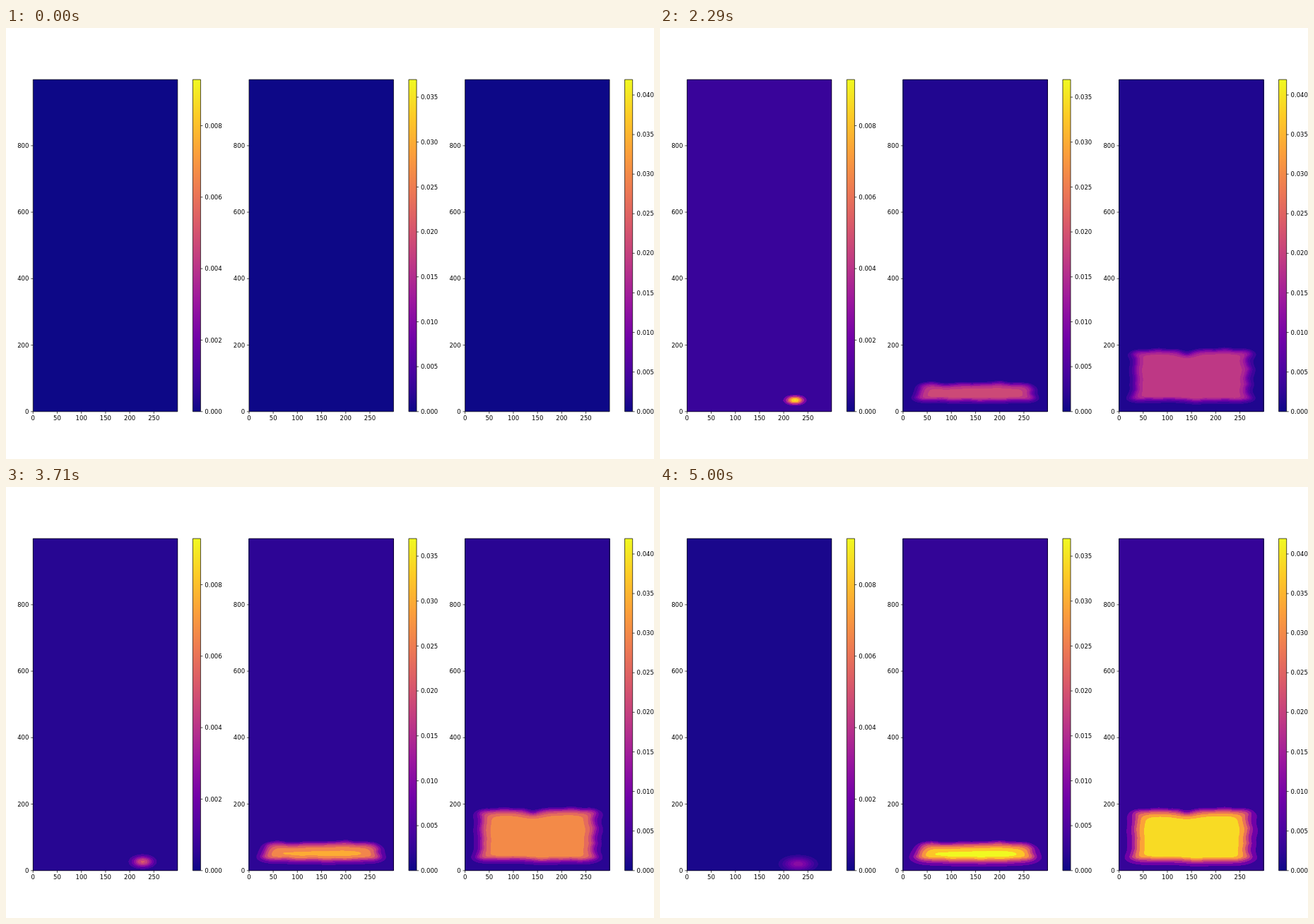
Animation, 917 px wide and 611 px high, one loop 5.08 s. Source, as an HTML page with a canvas:

```html
<!DOCTYPE html>
<html lang="en">
<head>
<meta charset="utf-8">
<title>Density fields</title>
<style>
  html, body { margin: 0; width: 100%; height: 100%; overflow: hidden; background: #fff; }
  canvas, svg { position: absolute; left: 0; top: 0; display: block; }
  text { font: 8.5px "DejaVu Sans", sans-serif; fill: #000; }
</style>
</head>
<body>
<canvas id="fields" width="917" height="611"></canvas>
<svg id="axes" width="917" height="611" viewBox="0 0 917 611"></svg>
<script>
const LOOP = 5080, LAST = 50;
const LEFT = 38.3, PITCH = 305.65, BOTTOM = 543.8, PLOT_W = 204.5, PLOT_H = 470.7;
const SX = PLOT_W / 299, SY = PLOT_H / 999;
const CELL = 2, W = 150, H = 112;

const panels = [
  { vmax: 0.00929, tick: 0.002 },
  { vmax: 0.03696, tick: 0.005 },
  { vmax: 0.04195, tick: 0.005 }
];

// Colour map
const stops = [
  [0, 13, 8, 135], [0.0555, 46, 5, 149], [0.1111, 70, 3, 159], [0.2222, 114, 1, 168],
  [0.3333, 156, 23, 158], [0.4444, 189, 55, 134], [0.5556, 216, 87, 107],
  [0.6667, 237, 121, 83], [0.7778, 251, 159, 58], [0.8889, 253, 202, 38], [1, 240, 249, 33]
];

function track(points, t, col = 1) {
  if (t <= points[0][0]) return points[0][col];
  for (let i = 1; i < points.length; i++) {
    const a = points[i - 1], b = points[i];
    if (t <= b[0]) return a[col] + (b[col] - a[col]) * (t - a[0]) / (b[0] - a[0]);
  }
  return points[points.length - 1][col];
}
const plasma = v => [1, 2, 3].map(c => Math.round(track(stops, v, c)));
const css = c => `rgb(${c.join(",")})`;

// Smooth curve through evenly spaced values
function curve(values, start, gap) {
  return x => {
    const p = Math.min(Math.max((x - start) / gap, 0), values.length - 1.001);
    const i = Math.floor(p), f = (1 - Math.cos(Math.PI * (p - i))) / 2;
    return values[i] + (values[i + 1] - values[i]) * f;
  };
}
const clamp01 = v => Math.min(1, Math.max(0, v));

function grid(fn) {
  const g = new Float32Array(W * H);
  for (let j = 0; j < H; j++)
    for (let i = 0; i < W; i++) g[j * W + i] = fn(i * CELL, j * CELL);
  return g;
}

function region(top, bottom, left, right) {
  const T = curve(top, 20, 20), B = curve(bottom, 20, 20);
  const L = curve(left, 25, 15), R = curve(right, 25, 15);
  const soft = d => clamp01(d / 6 + 0.5);
  return grid((x, y) => {
    const ripple = 1.2 * Math.sin(x * 0.47) + 0.8 * Math.sin(y * 0.4);
    return soft(T(x) + ripple - y) * soft(y - B(x) - ripple) *
           soft(x - L(y) - ripple) * soft(R(y) + ripple - x);
  });
}

function blur(u, n, sn, m, sm, a, times) {
  while (times--)
    for (let r = 0; r < m; r++) {
      let prev = u[r * sm];
      for (let c = 0; c < n; c++) {
        const i = r * sm + c * sn, cur = u[i];
        const next = c < n - 1 ? u[i + sn] : cur;
        u[i] = cur + a * (prev + next - 2 * cur);
        prev = cur;
      }
    }
}

function sink(u, part) {
  for (let i = 0; i < W * H; i++)
    u[i] = u[i] * (1 - part) + (i + W < W * H ? u[i + W] : 0) * part;
}

// Constant supply that spreads, sinks and decays
function simulate(source, decay) {
  const u = new Float32Array(W * H), out = [u.slice()];
  const add = () => source.forEach((s, i) => { u[i] = u[i] * (1 - decay) + s; });
  add();
  for (let k = 1; k <= LAST; k++) {
    blur(u, W, 1, H, W, 0.232, 7);
    blur(u, H, W, W, 1, 0.24, 2);
    sink(u, 0.2);
    add();
    out.push(u.slice());
  }
  return out;
}
const peakOf = g => g.reduce((a, b) => Math.max(a, b), 0);

const gauss = (x, y, cx, cy, sx, sy) =>
  Math.exp(-((x - cx) ** 2 / (sx * sx) + (y - cy) ** 2 / (sy * sy)) / 2);

const peakTrack = [[0, 0], [8, 0.0055], [18, 0.0085], [22, 0.0092], [27, 0.009],
                   [33, 0.0062], [41, 0.0038], [50, 0.0027]];
const spread = [[18, 13, 8.5], [27, 12.5, 9], [33, 13.5, 11], [41, 17, 12.5], [50, 21, 14]];
const spot = [[0, 0], [8, 0.0055], [18, 0.0022], [22, 0.0015], [33, 0.0004], [50, 0.0001]];
const arch = [[204, 34], [213, 39], [222, 41], [231, 39], [240, 34]];

function smallField(k) {
  const peak = track(peakTrack, k), mix = clamp01((k - 8) / 10);
  const sx = track(spread, k), sy = track(spread, k, 2);
  const cx = 222 + (k - 18) * 0.25, cy = 37 - (k - 18) * 0.53;
  const dot = track(spot, k), dotS = 5 + 3.5 * mix, dotY = 36 - 5 * mix;
  return grid((x, y) => {
    let v = dot * gauss(x, y, 106, dotY, dotS, dotS - 1.5 * mix);
    if (mix > 0) v += peak * mix * gauss(x, y, cx, cy, sx, sy);
    if (mix < 1)
      for (const [ax, ay] of arch) v += 0.8 * peak * (1 - mix) * gauss(x, y, ax, ay, 4.5, 4.5);
    return v;
  });
}

// Slight clumping on the plateau
const clumps = grid((x, y) => {
  const b = Math.max(gauss(x, y, 84, 115, 34, 48), gauss(x, y, 220, 115, 34, 56));
  const n = Math.sin(x * 0.5 + 2 * Math.sin(y * 0.13)) * Math.sin(y * 0.33 + Math.sin(x * 0.3));
  return b * (1 + 0.6 * n) - 0.5;
});

const low = simulate(region(
  [60, 84, 90, 81, 82, 87, 84, 86, 86, 92, 83, 86, 83, 60],
  [42, 36, 38, 41, 34, 37, 38, 33, 38, 34, 38, 39, 35, 42],
  [28, 25, 32, 37, 33, 38], [270, 275, 264, 268, 264, 266]), 0.0035);
const high = simulate(region(
  [178, 186, 184, 189, 185, 187, 170, 186, 188, 186, 191, 185, 188, 182],
  [37, 36, 42, 38, 42, 40, 38, 32, 39, 35, 40, 34, 37, 36],
  [27, 25, 30, 37, 34, 37, 35, 32, 36, 38, 27, 30, 32],
  [272, 273, 266, 262, 268, 264, 266, 270, 266, 262, 273, 270, 270]), 0);

const lowScale = 0.03696 / peakOf(low[LAST]);
const highScale = 0.04194 / peakOf(high[LAST]);
panels[0].frames = low.map((_, k) => smallField(k));
panels[1].frames = low.map(g => g.map(v => v * lowScale));
panels[2].frames = high.map((g, k) => {
  const grain = 0.008 * (1 - k / 55);
  return g.map((v, i) => v * highScale * (1 + grain * clumps[i]));
});

// Contour step: at most eight bands up to the peak
function bandStep(peak) {
  const raw = peak / 8, mag = 10 ** Math.floor(Math.log10(raw));
  return mag * [1, 1.5, 2, 2.5, 3, 4, 5, 6, 8, 10].find(s => s * mag >= raw * 0.99999);
}

const ctx = document.getElementById("fields").getContext("2d");
const IW = 409, IH = 209;
const buffer = document.createElement("canvas");
buffer.width = IW;
buffer.height = IH;
const bctx = buffer.getContext("2d");
const img = bctx.createImageData(IW, IH);

function drawField(panel, x0, k) {
  const g = panel.frames[k], peak = k ? peakOf(g) : 0;
  const step = peak ? bandStep(peak) : 0;
  const colors = [];
  for (let b = 0; b < 10; b++) colors.push(plasma((b + 0.5) * step / panel.vmax));
  ctx.fillStyle = css(colors[0]);
  ctx.fillRect(x0, BOTTOM - PLOT_H, PLOT_W, PLOT_H);
  if (!step) return;
  for (let py = 0, o = 0; py < IH; py++) {
    const gy = Math.min((IH - py - 0.5) / 2 / SY / CELL, H - 1.001);
    const j = Math.floor(gy), fy = gy - j;
    for (let px = 0; px < IW; px++, o += 4) {
      const gx = Math.min((px + 0.5) / 2 / SX / CELL, W - 1.001);
      const i = Math.floor(gx), fx = gx - i, q = j * W + i;
      const v = (g[q] * (1 - fx) + g[q + 1] * fx) * (1 - fy) +
                (g[q + W] * (1 - fx) + g[q + W + 1] * fx) * fy;
      const c = colors[Math.min(9, Math.floor(v / step))];
      img.data[o] = c[0];
      img.data[o + 1] = c[1];
      img.data[o + 2] = c[2];
      img.data[o + 3] = 255;
    }
  }
  bctx.putImageData(img, 0, 0);
  ctx.drawImage(buffer, x0, BOTTOM - IH / 2, IW / 2, IH / 2);
}

// Axes, ticks and colour bars
function buildAxes() {
  const top = BOTTOM - PLOT_H;
  let lines = "", out = '<defs><linearGradient id="bar" x1="0" y1="1" x2="0" y2="0">' +
    stops.map(([p, ...c]) => `<stop offset="${p}" stop-color="${css(c)}"/>`).join("") +
    "</linearGradient></defs>";
  const label = (x, y, s, anchor) => {
    out += `<text x="${x}" y="${y}" text-anchor="${anchor}">${s}</text>`;
  };
  panels.forEach((p, n) => {
    const x0 = LEFT + n * PITCH, bx = x0 + 226, bw = 11.1;
    out += `<rect x="${bx}" y="${top}" width="${bw}" height="${PLOT_H}" fill="url(#bar)"/>`;
    lines += `M${x0} ${top}h${PLOT_W}v${PLOT_H}h${-PLOT_W}z`;
    lines += `M${bx} ${top}h${bw}v${PLOT_H}h${-bw}z`;
    for (let v = 0; v <= 250; v += 50) {
      const x = x0 + v * SX;
      lines += `M${x} ${BOTTOM}v3`;
      label(x, BOTTOM + 12.2, v, "middle");
    }
    for (let v = 0; v <= 800; v += 200) {
      const y = BOTTOM - v * SY;
      lines += `M${x0} ${y}h-3`;
      label(x0 - 5.9, y + 3.1, v, "end");
    }
    for (let v = 0; v < p.vmax; v += p.tick) {
      const y = BOTTOM - PLOT_H * v / p.vmax;
      lines += `M${bx + bw} ${y}h3`;
      label(bx + bw + 5.9, y + 3.1, v.toFixed(3), "start");
    }
  });
  out += `<path d="${lines}" fill="none" stroke="#000" stroke-width="0.7"/>`;
  document.getElementById("axes").innerHTML = out;
}

// Ten steps a second, snapped to a 24 Hz clock
const startOf = k => Math.round(Math.round(2.4 * k) * 100 / 24) * 10;

let shown = -1;
function tick() {
  const t = performance.now() % LOOP;
  let k = LAST;
  while (k > 0 && startOf(k) > t) k--;
  if (k !== shown) {
    shown = k;
    panels.forEach((p, n) => drawField(p, LEFT + n * PITCH, k));
  }
  requestAnimationFrame(tick);
}

buildAxes();
tick();
</script>
</body>
</html>
```
